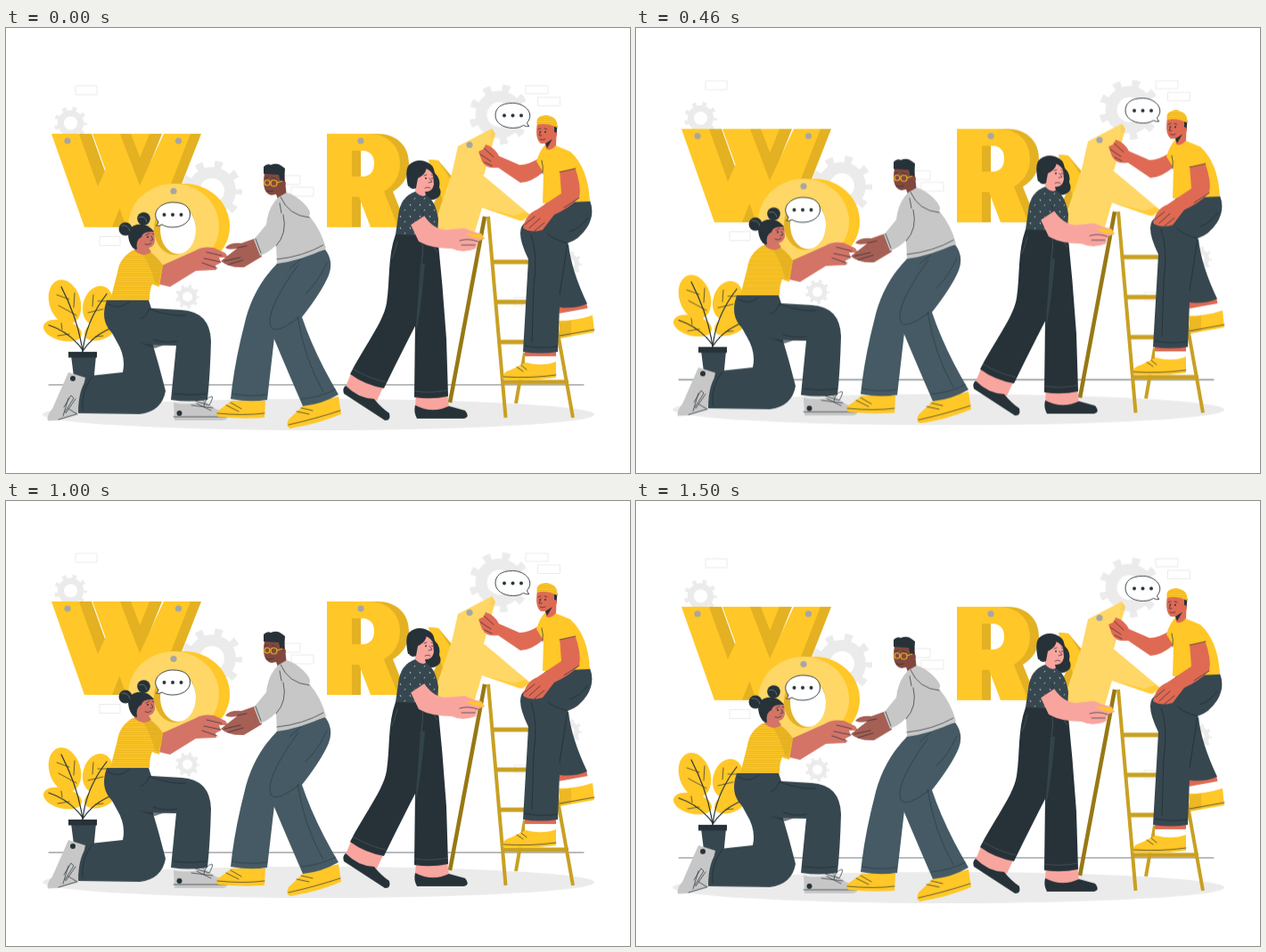
Write an HTML page without scripts that moves like this. It is 700 px wide and 500 px high and loops after 1540 ms.

```html
<!DOCTYPE html>
<html lang="en">
<head>
<meta charset="utf-8">
<title>Work</title>
<style>
html, body { margin: 0; height: 100%; overflow: hidden; background: #fff; }
svg { display: block; width: 100vw; height: 100vh; }
#scene { animation: bob 770ms linear -20ms infinite alternate; }
@keyframes bob { to { transform: translateY(-9.1px); } }
.sun { fill: #ffc727; }
.pale { fill: #ffd766; }
.side { fill: #e3b122; }
.ink { fill: #263238; }
.slate { fill: #37474f; }
.steel { fill: #455a64; }
.grey { fill: #c7c7c7; }
.pin { fill: #a6a6a6; }
.mist { fill: #ebebeb; }
.white { fill: #fff; }
.rose { fill: #d37467; }
.brown { fill: #a65f55; }
.deep { fill: #82483f; }
.pink { fill: #f9a59f; }
.coral { fill: #df6a54; }
.line { fill: none; stroke: #263238; stroke-width: .7; stroke-linecap: round; stroke-linejoin: round; }
.seam { fill: none; stroke: #1d282d; stroke-width: .6; }
.box { fill: none; stroke: #ebebeb; }
.bar { fill: none; stroke: #c9a022; stroke-width: 5; }
</style>
</head>
<body>
<svg viewBox="0 0 700 500" preserveAspectRatio="none">
<defs>
  <g id="gear" fill="none" stroke="#ebebeb">
    <circle r=".6" stroke-width=".38"/>
    <circle r=".88" stroke-width=".24" pathLength="16" stroke-dasharray=".8 1.2" stroke-dashoffset=".4"/>
  </g>
  <g id="bubble">
    <path class="white" d="M-16 8C-25-2-14-14 0-14S19.500-8 19.500 0 11 14 0 14C-5 14-9 13-12 11Q-15 13-18.500 12Q-16 10.500-16 8Z" stroke="#263238" stroke-width=".9"/>
    <g class="ink"><circle cx="-9.500" r="2"/><circle r="2"/><circle cx="9.500" r="2"/></g>
  </g>
  <path id="v1" d="M51 119H82L103 178 130 119H161L119 224H88Z"/>
  <path id="v2" d="M97 119H128L150 177 177 119H207L166 224H135Z"/>
  <path id="r" fill-rule="evenodd" d="M360 119H406C428 119 442 132 442 153C442 168 434 178 424 184L440 224H409L396 190H388V224H360ZM388 138V167H402Q413 165 413 152.500T402 138Z"/>
  <pattern id="knit" width="6" height="2.500" patternUnits="userSpaceOnUse">
    <path d="M0 1.200H6" stroke="#a57f10" stroke-width=".5" opacity=".6"/>
  </pattern>
  <pattern id="specks" width="11" height="13" patternUnits="userSpaceOnUse">
    <path d="M2 3l1 2M8 9l-1 1.500" stroke="#dfe5e8" stroke-width=".8"/>
  </pattern>
  <path id="shirt" d="M142 250Q127 259 125 275L117 306H161Q161 294 164 288L172 291 176 267Q168 256 160 251Z"/>
  <path id="blouse" d="M459 184Q442 190 440 211L437 232 484 234 485 215Q482 194 471 188Q466 191 459 184Z"/>
  <path id="beanie" d="M596 109Q593 99 606 98Q620 100 618 112Q606 106 596 109Z"/>
</defs>

<g id="scene">
  <!-- backdrop -->
  <ellipse class="mist" cx="350.500" cy="434.500" rx="309.500" ry="17.500"/>
  <path class="line" d="M48 401H648"/>
  <use href="#gear" transform="translate(72.500 107)scale(18.500)"/>
  <use href="#gear" transform="translate(231 183)scale(34)"/>
  <use href="#gear" transform="translate(553.500 97.500)scale(34)"/>
  <use href="#gear" transform="translate(203.500 302)scale(13.500)"/>
  <use href="#gear" transform="translate(632 265)scale(14)"/>
  <path class="box" d="M78 65h24v10h-24zM105 234.500h23v10h-23zM583 65h25v9h-25zM596.500 78h25v9.500h-25zM320 179h25v10h-25zM308 166h22v10h-22zM570 303h22v9h-22z"/>

  <!-- letters -->
  <use href="#v1" class="side" x="14"/><use href="#v1" class="sun"/>
  <use href="#v2" class="side" x="12"/><use href="#v2" class="sun"/>
  <use href="#r" class="side" x="10"/><use href="#r" class="sun"/>
  <path class="side" d="M474 148L485 149 501 168 495 220 466 225 486 185Z"/>
  <path class="sun" d="M474 148L485 149 501 174 490 194Z"/>
  <path class="pale" d="M545 113L507 133 500 164 480 222 486 230 524 236 534 202 580 217 588 210 533 164Z"/>
  <path class="sun" d="M545 113L533 164 536 166 549 119ZM534 202L577 217 588 210 582 207 570 211Z" opacity=".75"/>
  <ellipse class="sun" cx="200" cy="223" rx="51" ry="48"/>
  <ellipse class="pale" cx="188" cy="223" rx="51" ry="48"/>
  <ellipse class="side" cx="189.500" cy="226" rx="23.500" ry="29"/>
  <ellipse class="white" cx="193" cy="227" rx="20" ry="27"/>
  <g class="pin">
    <circle cx="69" cy="127" r="3.600"/><circle cx="193.500" cy="127" r="3.600"/>
    <circle cx="188" cy="183.500" r="3.600"/><circle cx="398" cy="127" r="3.600"/><circle cx="520" cy="131.500" r="3.600"/>
  </g>
  <use href="#bubble" x="187" y="210"/>
  <use href="#bubble" transform="translate(568.500 98.500)scale(-1 1)"/>

  <!-- plant -->
  <g class="sun">
    <ellipse rx="17.500" ry="25.500" transform="translate(66 308)rotate(-17)"/>
    <ellipse rx="16.500" ry="22.500" transform="translate(103 312)rotate(17)"/>
    <ellipse rx="22" ry="11.500" transform="translate(63.500 340)rotate(14)"/>
    <ellipse rx="19" ry="11" transform="translate(106 339)rotate(-22)"/>
  </g>
  <path class="line" style="stroke-width:1.200" d="M86 365Q82 330 62 291M86 365Q89 330 113 299M86 362Q72 342 48 334M87 362Q98 345 121 336"/>
  <path class="line" d="M79 323L59 312M76 314L77 298M71 305L57 300M92 320L109 316M97 313L98 300M103 307L115 307M71 344L58 346M63 339L62 332M100 347L109 346"/>
  <path class="slate" d="M73 368H101L98 400H77Z"/>
  <path class="ink" d="M70 364H102V370.500H70Z"/>

  <!-- kneeling woman -->
  <path class="grey" d="M70 387L89 393 80 435 59 441 47 441.500Q45 436 52 428Z"/>
  <path class="line" d="M59 440L79 434M64 436L70 416M67 433L78 417M65 426L73 413 76 416 66 432M70 428L80 434"/>
  <circle class="ink" cx="75" cy="394" r="3"/>
  <path class="grey" d="M188 421Q205 425 222 419L235 428Q247 432 248.500 437Q248 441 242 441H189Z"/>
  <path class="line" d="M188 437H248M208 424L232 427M214 422L230 430M222 419Q207 411 212 419L228 424Q233 415 231 414Q223 416 222 425"/>
  <circle class="ink" cx="194.500" cy="433" r="3"/>
  <path class="slate" d="M113 315Q112 333 124 352Q135 370 131 387L94 391Q81 403 81 433L150 434Q175 431 179 408Q172 380 163 350Z"/>
  <path class="ink" opacity=".65" d="M129 347L184 354 167 360Z"/>
  <path class="slate" d="M113 306H160L163 315L197 317Q229 319 230 352Q229 390 226 418Q205 421 185 418L191 357Q150 357 127 349Q106 336 111 313Z"/>
  <path class="seam" d="M86 430Q84 407 97 392M188 411Q207 414 226 411M161 315Q158 324 151 327M114 310Q126 318 138 308M165 350Q179 355 192 352M161 316Q187 325 202 323"/>
  <path class="rose" d="M175 267L213 250Q220 245 233 247L246 253 249 258 239 258 241 264 235 267 236 272 213 273 184 291 167 287Z"/>
  <path class="line" d="M222 259L241 263M220 264L237 270M225 252L242 256"/>
  <use href="#shirt" class="sun"/><use href="#shirt" fill="url(#knit)"/>
  <path class="side" opacity=".8" d="M150 250Q161 263 167 286L171 288 176 267Q169 256 160 251Z"/>
  <circle class="ink" cx="134" cy="226" r="7.500"/><circle class="ink" cx="154.500" cy="214.500" r="7.300"/>
  <path class="rose" d="M144 233V250Q154 259 163 252L160 247Q165 247 167 240L166 228 158 223Z"/>
  <path class="ink" d="M166 229Q159 219 147 221Q134 224 138 239Q141 249 147 249Q145 238 152 235Q153 228 166 229Z"/>
  <path class="line" style="stroke:#78848a" d="M130 222Q137 221 139 228M149 213Q156 210 158 218"/>
  <path class="line" d="M157 233L161 231M164 231L166 232M163 234L165 238 162 239M156 243Q160 245 163 242"/>
  <circle class="ink" cx="159" cy="235" r="1"/>

  <!-- man in hoodie -->
  <path class="sun" d="M253 419L291 419 290 438Q264 440 238 437Q233 432 241 428Z"/>
  <path class="sun" d="M333 425L373 414 376 434Q350 445 319 450Q313 448 317 440Z"/>
  <path class="line" d="M237 433Q267 436 290 433M247 424L261 431M252 421L264 428M317 446Q348 439 375 430M326 431L340 434M331 427L344 430"/>
  <path class="steel" d="M305 264Q276 293 267 335Q256 378 252 417Q273 421 293 418L301 348 334 281Z"/>
  <path class="steel" d="M303 265L358 249Q368 262 362 278Q354 297 332 325C342 355 357 385 373 412Q354 423 333 425Q313 379 296 338Q292 322 309 299L318 274Z"/>
  <path class="seam" d="M253 411Q273 415 293 412M331 417Q353 415 370 406M329 325Q296 350 296 330Q296 310 328 266M318 271Q325 265 331 260M360 264Q350 286 336 299M327 324Q335 373 356 409" stroke-dasharray="none" opacity=".7"/>
  <path class="brown" d="M281 236L264 242Q251 241 246 247Q249 250 259 248L241 262Q250 270 267 269L287 257Z"/>
  <path class="line" d="M245 262L263 258M249 266L266 261M260 247L270 245"/>
  <path class="deep" d="M290 163Q286 186 298 188L303 187 306 195 315 190 312 163Z"/>
  <path class="grey" d="M306 190Q294 201 292 221L278 238 285 256Q296 252 303 244L304 265Q329 262 359 248Q354 228 340 211Q344 207 333 196Q323 187 315 185Z"/>
  <path class="line" d="M308 190Q317 211 340 213M311 210Q316 231 303 245M280 237L286 253M304 260Q333 257 356 244M307 197L309 208"/>
  <path class="ink" d="M289 164L289 156Q293 152 297 154Q304 151 309 155L313 158 312 173 308 174 306 165Z"/>
  <circle class="deep" cx="310.500" cy="175" r="3.300"/>
  <g fill="none" stroke="#e8b323" stroke-width="1.200"><circle cx="293" cy="174" r="3"/><circle cx="300.500" cy="174.500" r="3.500"/><path d="M304 174L310 172"/></g>
  <path class="line" d="M292 183Q296 185 300 183M290 169L294 168M298 168L303 170"/>

  <!-- ladder -->
  <path class="bar" d="M546 263H586M551 308H588M554 353H590M559 398H631"/>
  <path class="bar" style="stroke-width:4" d="M582 365L572 422M541 212L560.500 438M597 220L636 438"/>
  <path d="M537 212L498 421" stroke="#987814" stroke-width="4.500"/>

  <!-- woman holding the K -->
  <path class="pink" d="M388 386L424 402 416 419Q394 414 381 403ZM460 410H495L497 427Q477 434 459 426Z"/>
  <path class="ink" d="M381 402Q395 416 413 417Q421 427 430 433Q432 442 425 441L379 411Q377 405 381 402ZM459 424Q478 434 497 425L515 430Q521 437 514 439H461Q457 432 459 424Z"/>
  <path class="ink" d="M437 232H484Q490 290 494 349L496 414Q477 418 458 415L459 335Q441 370 424 405Q402 401 386 389C401 359 424 330 427 309C431 283 428 257 437 232Z"/>
  <path class="slate" d="M465 264L470 265Q466 315 459 348Z" opacity=".8"/>
  <path class="seam" style="stroke:#52636b" d="M389 383Q407 394 426 398M458 408Q477 411 496 407M466 238Q469 247 466 264M439 240Q435 256 432 260M475 237Q481 249 484 252"/>
  <path class="ink" d="M451 178Q447 160 452 154Q460 147 470 150Q480 153 481 163Q488 170 486 179Q490 187 484 191Q477 196 470 190L464 178Z"/>
  <path class="pink" d="M459 170L459 186Q465 192 471 188L470 184Q478 185 480 176L479 165Q475 158 467 157Z"/>
  <path class="ink" d="M471 153Q474 163 462 169L460 180Q454 183 451 176L454 155Z"/>
  <path class="line" d="M469 166L472 165M477 165L479 166M475 169L478 173 474 174M470 180Q473 178 476 180"/>
  <circle class="ink" cx="471" cy="169" r="1"/><circle class="ink" cx="478" cy="169" r=".8"/>
  <use href="#blouse" class="slate"/><use href="#blouse" fill="url(#specks)"/>
  <path class="pink" d="M454 221L469 211Q480 227 494 227L514 225Q525 230 533 231L537 237 529 240 527 248Q512 254 500 248Q477 248 463 240Z"/>
  <path class="sun" d="M515 231L533 232 537 237 525 236Z"/>
  <path class="line" d="M509 239Q519 236 529 240M511 244L526 244M454 221L469 211 466 205"/>

  <!-- man on the ladder -->
  <path class="coral" d="M619 314L651 309 653 317 621 322ZM582 362H617V374H582Z"/>
  <path class="white" d="M620 321L653 315V324L620 330ZM582 369H618V380H582Z"/>
  <path class="sun" d="M620 329Q640 329 658 323L660 342 621 349ZM583 376Q602 381 617 375V393Q589 397 558 395Q555 387 567 384Z"/>
  <path class="side" d="M621 331L634 329 634 346 621 349Z" opacity=".65"/>
  <path class="line" d="M621 346L660 339M558 392Q589 394 617 390M573 381L580 386M578 379L584 384"/>
  <path class="slate" d="M609 250L631 243Q634 272 652 310Q638 316 621 314L607 283Z"/>
  <path class="slate" d="M607 196L655 194Q661 209 652 224Q643 238 630 242L622 288 619 364Q599 367 580 364L586 260Q569 225 584 218Z"/>
  <path class="seam" d="M581 357Q600 361 619 358M589 232Q597 254 592 290L590 353M630 242Q614 238 607 231M630 242L621 300M653 213Q643 226 632 229"/>
  <path class="coral" d="M600 145Q587 154 576 154L553 144Q548 134 538 131L536 136 530 139 534 150Q539 159 552 157L577 174Q589 174 604 161Z"/>
  <path class="line" d="M536 135L547 145M532 142L544 150M537 151L545 155"/>
  <path class="sun" d="M606 130Q599 137 595 150L603 163 602 197 655 195Q653 157 633 139L616 132Z"/>
  <path class="coral" d="M621 159L638 156Q646 178 643 191Q631 203 615 210L602 227Q589 231 580 225Q583 209 596 204L623 186Z"/>
  <path class="sun" d="M617 137Q634 138 640 158L621 162Z"/>
  <path class="line" d="M582 221L593 212M587 225L599 214M593 228L604 219M621 162L639 158M602 164Q603 155 601 149M643 191L626 202"/>
  <path class="coral" d="M596 107Q593 125 600 130L605 130 606 136Q611 139 617 132L618 108Z"/>
  <path class="ink" d="M615 108L618.500 110 617.500 120 615 118ZM605 130L613 125 607 135Z"/>
  <use href="#beanie" class="sun"/><use href="#beanie" fill="url(#knit)"/>
  <circle class="coral" cx="615" cy="120" r="3"/>
  <path class="line" d="M597 114L600 113M604 113L607 114M600 116L598 121 601 121M599 125Q602 127 605 125"/>
  <circle class="ink" cx="599" cy="117" r=".8"/><circle class="ink" cx="605" cy="117" r="1"/>
</g>
</svg>
</body>
</html>
```
